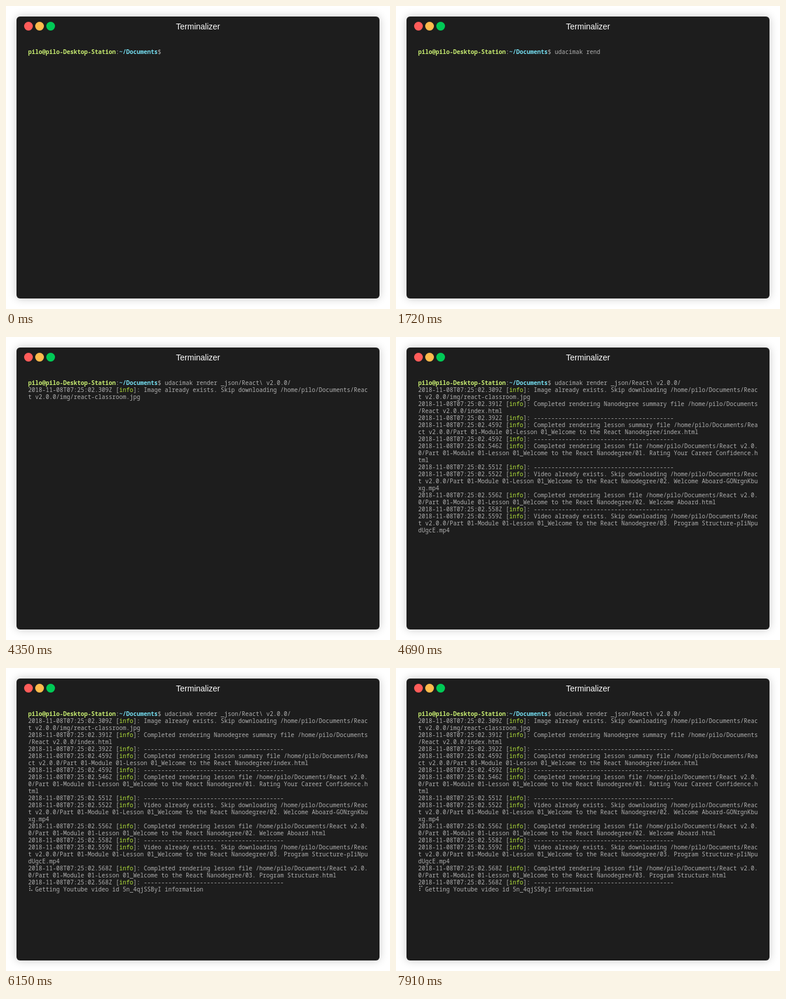
These frames come from a looping animation (658x518 px, 7990 ms). An HTML page:

```html
<!DOCTYPE html>
<html lang="en">
<head>
<meta charset="utf-8">
<title>Terminalizer</title>
<style>
  html, body { margin: 0; width: 100%; height: 100%; overflow: hidden; background: #fff; }
  .window {
    position: absolute; left: 18px; top: 18px; width: 622px; height: 482px;
    border-radius: 6px; background: #1d1d1d; box-shadow: 0 0 15px rgba(0, 0, 0, .22);
  }
  .dot { position: absolute; top: 9px; width: 15px; height: 15px; border-radius: 50%; }
  .title {
    position: absolute; left: 0; top: 9px; width: 100%; text-align: center;
    font: 14px/16px "Liberation Sans", Arial, sans-serif; color: #fff;
  }
  .screen {
    position: absolute; left: 20px; top: 54px; color: #afafaf;
    font: 10px/12px "Noto Sans Mono", "DejaVu Sans Mono", monospace;
    font-variant-ligatures: none; white-space: pre;
  }
  .row { height: 12px; }
  .host { color: #c8ed71; font-weight: 700; }
  .path { color: #75dff2; font-weight: 700; }
  .info { color: #b3e33b; }
  .spin {
    display: inline-block; width: 12px; height: 12px; vertical-align: top;
    font: 12px/12px "DejaVu Sans", "DejaVu Sans Mono", sans-serif;
  }
</style>
</head>
<body>
<div class="window">
  <div class="dot" style="left:13px;background:#ff5c5a"></div>
  <div class="dot" style="left:32px;background:#ffbb4c"></div>
  <div class="dot" style="left:51px;background:#00ca56"></div>
  <div class="title">Terminalizer</div>
  <div class="screen" id="screen"><div class="row"><span class="host">pilo@pilo-Desktop-Station</span>:<span class="path">~/Documents</span>$ <span id="typed"></span></div></div>
</div>
<script>
const LOOP = 7990, COLS = 97, TICK = 80, SPIN_START = 4790;
const SPIN = [..."⠋⠙⠹⠸⠼⠴⠦⠧⠇⠏"];
const COMMAND = "udacimak render _json/React\\ v2.0.0/";

// [time, characters shown]; the jumps are tab completions
const KEYS = [
  [570, 1], [670, 2], [760, 3], [860, 4], [950, 5], [1050, 6], [1140, 7], [1240, 8],
  [1430, 10], [1530, 11], [1620, 12], [1720, 13], [1870, 14], [1950, 15],
  [2280, 17], [2420, 22], [2740, 23], [2950, 36]
];

const ROOT = "/home/pilo/Documents/React v2.0.0/";
const LESSON = ROOT + "Part 01-Module 01-Lesson 01_Welcome to the React Nanodegree/";
const RULE = "-".repeat(40);
const exists = (kind, file) => `${kind} already exists. Skip downloading ${file}`;
const done = (what, file) => `Completed rendering ${what} file ${file}`;

// [time, milliseconds in the stamp, message]
const LOG = [
  [4350, 309, exists("Image", ROOT + "img/react-classroom.jpg")],
  [4430, 391, done("Nanodegree summary", ROOT + "index.html")],
  [4430, 392, RULE],
  [4520, 459, done("lesson summary", LESSON + "index.html")],
  [4520, 459, RULE],
  [4600, 546, done("lesson", LESSON + "01. Rating Your Career Confidence.html")],
  [4600, 551, RULE],
  [4600, 552, exists("Video", LESSON + "02. Welcome Aboard-GONrgnKbuxg.mp4")],
  [4690, 556, done("lesson", LESSON + "02. Welcome Aboard.html")],
  [4690, 558, RULE],
  [4690, 559, exists("Video", LESSON + "03. Program Structure-pIiNpudUgcE.mp4")],
  [4790, 568, done("lesson", LESSON + "03. Program Structure.html")],
  [4790, 568, RULE]
];

const screen = document.getElementById("screen");
const typed = document.getElementById("typed");
const entries = [];

function add(parent, tag, cls, text = "") {
  const el = document.createElement(tag);
  el.className = cls;
  el.textContent = text;
  return parent.appendChild(el);
}

for (const [time, ms, message] of LOG) {
  const head = `2018-11-08T07:25:02.${ms}Z [`;
  const line = `${head}info]: ${message}`;
  const el = add(screen, "div", "entry");
  for (let i = 0; i < line.length; i += COLS) {
    const part = line.slice(i, i + COLS);
    const row = add(el, "div", "row", i ? part : head);
    if (!i) {
      add(row, "span", "info", "info");
      row.append(part.slice(head.length + 4));
    }
  }
  entries.push({ time, el });
}

const status = add(screen, "div", "row");
const spin = add(status, "span", "spin");
status.append("Getting Youtube video id 5n_4qjSSByI information");
entries.push({ time: SPIN_START, el: status });

function draw(t) {
  let count = 0;
  for (const [time, n] of KEYS) if (t >= time) count = n;
  typed.textContent = COMMAND.slice(0, count);
  for (const { time, el } of entries) el.style.visibility = t >= time ? "visible" : "hidden";
  const step = Math.max(0, Math.floor((t - SPIN_START) / TICK));
  spin.textContent = SPIN[step % SPIN.length];
}

const start = performance.now();
function frame() {
  draw((performance.now() - start) % LOOP);
  requestAnimationFrame(frame);
}
frame();
</script>
</body>
</html>
```
